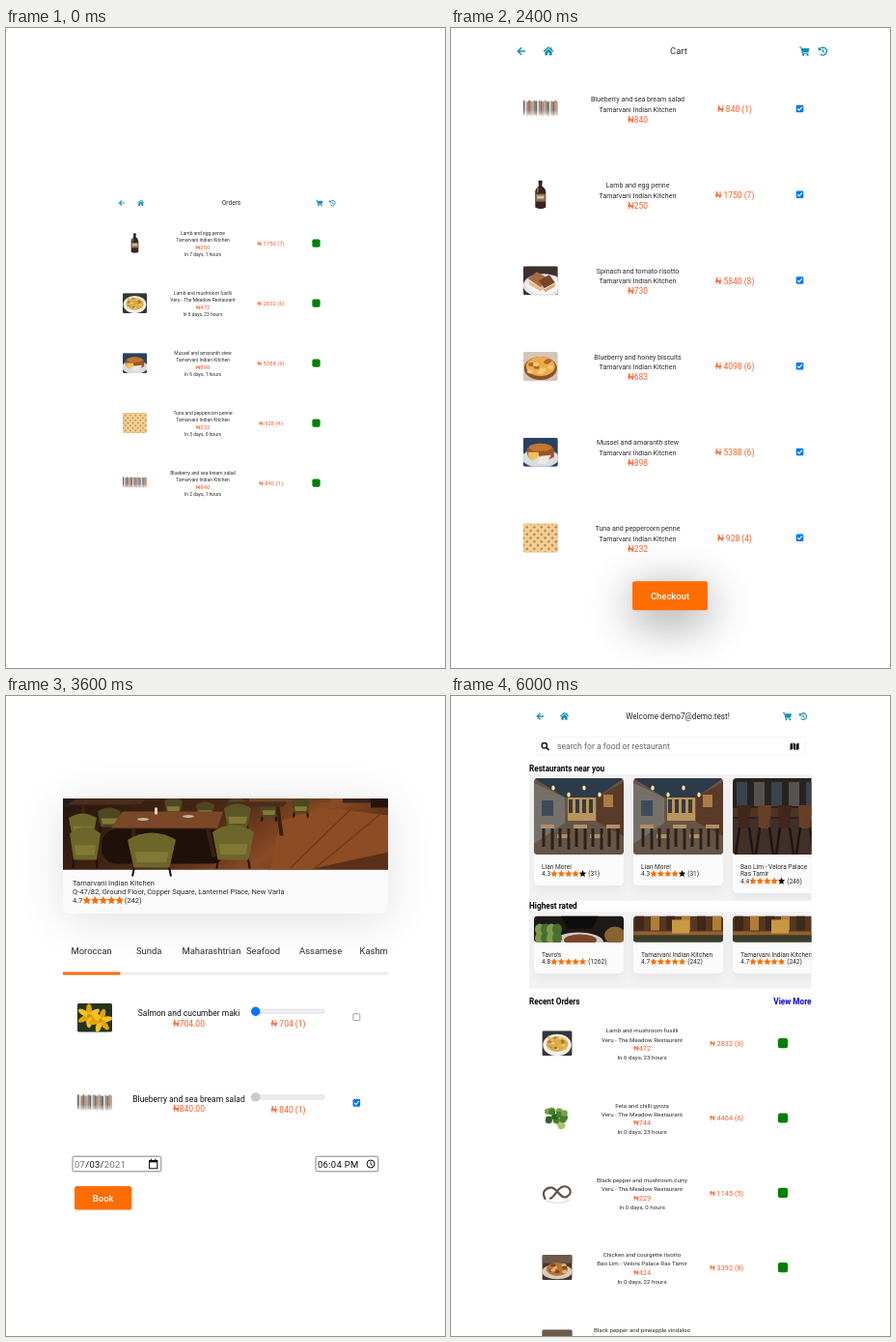
Write an HTML page that moves like this. It is 455x662 px and loops after 7.2 s.

```html
<!DOCTYPE html>
<html lang="en">
<head>
<meta charset="utf-8">
<title>Food ordering screens</title>
<style>
html, body { margin: 0; width: 100%; height: 100%; overflow: hidden; background: #fff; }
#stage { display: block; width: 455px; height: 662px; font-family: Roboto, sans-serif; }
.pay { font-family: "Open Sans", "Noto Sans", sans-serif; }
text { white-space: pre; }
</style>
</head>
<body>
<svg id="stage" viewBox="0 0 455 662"></svg>
<script>
const STEP = 1200;
const INK = '#2a2a2a', ORANGE = '#ff6d00', PRICE = '#ff5c26', TEAL = '#168db5', BLUE = '#0075ff';
const KITCHEN = 'Tamarvani Indian Kitchen';
const GARDEN = 'Veru - The Meadow Restaurant';
const PALACE = 'Bao Lim - Velora Palace Ras Tamir';

// Shape helpers; text is placed by the middle of its capitals.
const rect = (x, y, w, h, fill, r = 0, more = '') =>
  `<rect x="${x}" y="${y}" width="${w}" height="${h}" rx="${r}" fill="${fill}" ${more}/>`;
const oval = (x, y, rx, ry, fill) => `<ellipse cx="${x}" cy="${y}" rx="${rx}" ry="${ry}" fill="${fill}"/>`;
const fill = (d, color) => `<path d="${d}" fill="${color}"/>`;
const line = (d, color, w = 1) => `<path d="${d}" fill="none" stroke="${color}" stroke-width="${w}"/>`;
const text = (x, y, size, str, color = INK, anchor = 'start', more = '') =>
  `<text x="${x}" y="${y + size * .355}" font-size="${size}" fill="${color}" text-anchor="${anchor}" ${more}>${str}</text>`;
const mid = (x, y, size, str, color, more) => text(x, y, size, str, color, 'middle', more);
const at = (x, y, k, body) => `<g transform="translate(${x} ${y}) scale(${k})">${body}</g>`;
const range = (n, fn) => Array.from({ length: n }, (_, i) => fn(i)).join('');
let clips = 0;
const clip = (x, y, w, h, body, r = 0) => {
  const id = 'clip' + clips++;
  return `<clipPath id="${id}">${rect(x, y, w, h, '#000', r)}</clipPath><g clip-path="url(#${id})">${body}</g>`;
};
const BOLD = 'font-weight="700"', MEDIUM = 'font-weight="500"';

const defs = `<defs>
<filter id="wide" x="-150%" y="-300%" width="400%" height="700%"><feGaussianBlur stdDeviation="24"/></filter>
<filter id="near" x="-30%" y="-30%" width="160%" height="160%"><feGaussianBlur stdDeviation="6"/></filter>
<linearGradient id="fade" x2="0" y2="1"><stop stop-color="#fff" stop-opacity="0"/><stop offset="1" stop-color="#fff"/></linearGradient>
<linearGradient id="floor" x2="1" y2=".3"><stop stop-color="#24150d"/><stop offset=".5" stop-color="#4a2814"/><stop offset=".8" stop-color="#8a4b25"/><stop offset="1" stop-color="#5a3019"/></linearGradient>
<linearGradient id="wall" x2="1"><stop stop-color="#261b17"/><stop offset=".5" stop-color="#46301f"/><stop offset="1" stop-color="#2a1a12"/></linearGradient>
<linearGradient id="edge" x2="1"><stop stop-color="#fff"/><stop offset="1" stop-color="#f3f3f3"/></linearGradient>
</defs>`;

// Icons in a box of about ten units around the origin
const icons = {
  back: line('M4 0H-3.4M0-3.8L-3.7 0L0 3.8', TEAL, 1.5),
  home: line('M-5 .2L0-4L5 .2', TEAL, 1.2) +
    fill('M-3.6 .6L0-2.4L3.6 .6V4.3H.9V1.6H-.9V4.3H-3.6ZM2.3-4H3.6V-.8L2.3-2Z', TEAL),
  cart: line('M-5.2-4H-3.4L-2 2.2H4', TEAL, 1.1) + fill('M-3-3.1H5.2L4.2 1.2H-2.1Z', TEAL) +
    oval(-1.2, 3.8, 1.1, 1.1, TEAL) + oval(3.3, 3.8, 1.1, 1.1, TEAL),
  past: line('M-3.2-2.2A4 4 0 1 1-2.7 3M0-2.2V.4L1.8 1.6', TEAL, 1.2) + fill('M-4.8-4.4V-.7H-1Z', TEAL),
};
const star = (x, y, r, color) => fill('M' + Array.from({ length: 10 }, (_, i) => {
  const a = i * Math.PI / 5, q = i % 2 ? r * .48 : r;
  return `${(x + q * Math.sin(a)).toFixed(2)} ${(y - q * Math.cos(a)).toFixed(2)}`;
}).join('L') + 'Z', color);
const rating = (x, y, size, score, full, count, gap = 0) => {
  const pitch = size * 1.12, left = x + size * 1.4;
  return text(x, y, size, score) +
    range(5, i => star(left + pitch * (i + .5), y, pitch * .53, i < full ? ORANGE : '#111')) +
    text(left + pitch * 5 + size * .1 + gap, y, size, `(${count})`);
};
const tickBox = (x, y, on) => on
  ? rect(x - 3.8, y - 3.8, 7.6, 7.6, BLUE, 1.2) + line(`M${x - 2.2} ${y}l1.6 1.7l3-3.6`, '#fff', 1.1)
  : rect(x - 3.5, y - 3.5, 7, 7, '#fff', 1.1, 'stroke="#767676" stroke-width=".7"');

// Dishes, 36 by 30 around the origin
const BG = c => rect(-18, -15, 36, 30, c);
const PENS = ['#6b5d58', '#b9a48f', '#8a6650', '#e3d9cc', '#7b8f83', '#b8857b', '#8d90a6'];
const dishes = {
  pens: rect(-18, -8, 36, 14, '#cfc5bb') + range(20, i => rect(-18 + i * 1.8, -9 + i % 3 * .8, 1.6, 15, PENS[i * 3 % 7])) +
    rect(-18, 1, 36, 9, 'url(#fade)'),
  bottle: fill('M-2-14H1.6V-9Q6-6 5.5-2V13Q0 16-5.5 13V-2Q-6-6-2-9Z', '#37251f') + rect(-2.2, -15, 4, 3, '#222', 1) +
    rect(-5, -1, 10, 8, '#8f6d55') + rect(-3.5, 1, 7, 3, '#d9c2a4') + rect(-3.7, -8, 1.4, 6, '#94827a', .7),
  sandwich: BG('#3d302d') + oval(3, 5, 21, 12, '#e4e5ea') + oval(3, 5, 17, 9, '#f5f5f6') +
    fill('M-13-2L-4-9L9-2L0 7Z', '#a86b40') + fill('M-12 0L0 7L9 0V4L0 11L-12 4Z', '#e5bd8b') +
    fill('M-2 0L9-6L15 2L4 8Z', '#75472b') + fill('M-1 4L4 9L15 3V6L5 12Z', '#d5a575'),
  pie: BG('#d3c5b7') + oval(0, 2, 17, 12, '#90502b') + oval(0, 0, 15, 10, '#e9ad48') +
    range(9, i => oval(11 * Math.sin(i * 2.3), 6 * Math.cos(i * 2.9), 3, 2, i % 2 ? '#b66526' : '#f0cc75')),
  cake: BG('#284263') + oval(0, 6, 19, 10, '#d9dde1') + fill('M-14-4Q-1-14 14-4V5Q4 11-2 3L-9 8Q-15 5-14-4Z', '#9d5427') +
    fill('M-13 0L-2 0V5L-9 9Q-13 6-13 0Z', '#f0c05a') + oval(0, -5, 12, 4, '#c4752e') + fill('M0 4L11 3L6 12H-4Z', '#eee8df'),
  lattice: BG('#c08a4e') +
    range(9, i => line(`M${-44 + i * 7.5} 15l30-30M${-44 + i * 7.5}-15l30 30`, '#f0cf96', 3)),
  fusilli: BG('#343637') + oval(0, 2, 17, 13, '#f2efe9') + oval(0, 1, 13, 9, '#d9aa4c') +
    range(18, i => oval(10 * Math.sin(i * 2.4), 6.5 * Math.cos(i * 1.7), 2.3, 1.3, ['#f0d184', '#a87529', '#e5bb56'][i % 3])),
  broccoli: fill('M-5 0L2 13Q8 15 10 9L5-2Z', '#a8c66c') +
    range(13, i => oval(-1 + 10 * Math.sin(i * 2.4), -3 + 6 * Math.cos(i * 1.9), 4, 3.7, ['#487d2d', '#2f6422', '#75a44c'][i % 3])),
  loop: line('M-14 8Q-20-3-9-6C0-8 3 8 11 5C20 1 15-10 6-7C-1-4-3 6-9 7', '#62544d', 2.6) +
    line('M-14 9Q0 15 15 9', '#ddd', 1.3),
  risotto: BG('#4a3529') + rect(-18, -15, 36, 10, '#6d5a49') + oval(0, 5, 18, 9, '#d7cbbb') + oval(0, 2, 13, 8, '#b77432') +
    range(8, i => oval(9 * Math.sin(i * 2), 1 + 4 * Math.cos(i * 2.7), 3, 2, i % 2 ? '#e3b465' : '#804523')),
  lily: BG('#25331b') + range(2, j => at(-6 + j * 12, -2 + j * 5, 1, range(6, i =>
    `<ellipse cy="-6" rx="2.9" ry="6.5" fill="${i % 2 ? '#f4c21c' : '#e2a40d'}" transform="rotate(${i * 60 + j * 18})"/>`) + oval(0, 0, 2, 2, '#c98f14'))),
};
const dish = (x, y, k, name) => at(x, y, k, clip(-18, -15, 36, 30, dishes[name], 2));

// Large photographs
const chair = (x, y, w, h, c = '#6d662a') =>
  line(`M${x + w * .2} ${y + h * .6}L${x + w * .1} ${y + h * 1.25}M${x + w * .8} ${y + h * .6}L${x + w * .9} ${y + h * 1.25}`, '#1c0f08', 2) +
  fill(`M${x} ${y + h * .2}Q${x + w / 2} ${y - h * .2} ${x + w} ${y + h * .2}L${x + w * .87} ${y + h}H${x + w * .13}Z`, c) +
  fill(`M${x + w * .15} ${y + h * .55}H${x + w * .85}L${x + w * .8} ${y + h * .85}H${x + w * .2}Z`, '#827a34');
const table = (x, y, w, h, c = '#4a2d1d') =>
  line(`M${x + w * .2} ${y + h}V${y + h + 38}M${x + w * .86} ${y + h}L${x + w * .92} ${y + h + 30}`, '#3b2012', 4) +
  fill(`M${x + w * .1} ${y}H${x + w}L${x + w * .95} ${y + h}H${x}Z`, c);
const diningRoom = rect(0, 0, 337, 130, 'url(#wall)') + fill('M0 0H337V17L210 24L0 13Z', '#1d1512') +
  line('M80 0L195 22M160 0L210 20M240 0L225 20M337 3L245 21', '#5d452f', 1.5) +
  fill('M0 66L190 52L337 56V130H0Z', 'url(#floor)') +
  range(5, i => rect(48 + i * 17, 18 + i * 3, i % 2 ? 1 : 2, 28, i % 2 ? '#8f6238' : '#f3d7a2')) +
  rect(200, 25, 79, 34, '#7c5229') + range(3, i => rect(202, 27 + i * 7, 74, 1.5, '#e0b873')) +
  range(15, i => rect(203 + i * 5, 29 + i % 3 * 7, 2, 4, i % 2 ? '#e6d2a8' : '#38220f')) +
  rect(190, 45, 90, 3, '#d9b680') + rect(193, 48, 84, 12, '#6f4320') +
  rect(290, 15, 47, 46, '#38251a') + rect(319, 10, 18, 56, '#24160f') +
  fill('M225 80L270 66L337 74V112L255 130H215Z', '#8d4c24') + line('M236 128L300 66M262 128L330 72', '#70391a', 1.5) +
  range(5, i => chair(105 + i * 33, 56 + i % 2 * 4, 19, 16, '#4d4723')) +
  table(5, 57, 80, 6) + table(164, 60, 68, 5) +
  chair(6, 72, 29, 24) + chair(36, 66, 24, 20, '#4d4723') + chair(167, 62, 28, 24, '#5c5526') +
  rect(40, 88, 130, 36, '#1e110a', 16) +
  table(50, 70, 116, 17, '#7a4829') + rect(95, 66, 3, 7, '#ddd2b9') + oval(130, 75, 6, 1.5, '#c9b99e') + oval(83, 78, 6, 1.5, '#c9b99e') +
  chair(67, 92, 50, 36) + chair(155, 84, 43, 36) + chair(7, 86, 32, 34);
const cafe = rect(0, 0, 93, 79, '#6a5341') + fill('M0 0H93L65 20H32Z', '#2d3a48') +
  fill('M0 5L32 20V48L0 68Z', '#75716a') + fill('M93 4L65 20V45L93 60Z', '#5a3a28') + rect(35, 20, 29, 24, '#b8945f') +
  range(4, i => rect(36 + i * 7, 22, 4, 14, '#3c3a38') + oval(20 + i * 16, 10 + i % 2 * 7, 1.7, 2.5, '#ffe7ac')) +
  fill('M0 68L34 45H64L93 65V79H0Z', '#645545') +
  range(5, i => rect(7 + i * 17, 48 + i % 2 * 10, 14, 4, '#b08f68') + line(`M${10 + i * 17} 52v19M${19 + i * 17} 52v22`, '#2e2019', 3)) +
  rect(72, 17, 10, 13, '#a97c48') + rect(8, 23, 12, 16, '#3d4c5a');
const lounge = rect(0, 0, 93, 79, '#29231f') + range(5, i => rect(4 + i * 18, 4, 11, 25, i % 2 ? '#55524f' : '#38434c')) +
  rect(0, 31, 93, 9, '#4f3425') + fill('M0 42H93V79H0Z', '#403027') +
  range(4, i => fill(`M${5 + i * 21} 28h14l-2 24h-11Z`, i % 2 ? '#673f28' : '#3f271c') +
    line(`M${7 + i * 21} 51l-4 28M${17 + i * 21} 51l4 28`, '#1c1512', 2.5));
const plates = rect(0, 0, 93, 27, '#1d1917') + oval(46, 27, 26, 10, '#cfcac2') + oval(48, 25, 17, 6, '#7d4429') +
  range(8, i => oval(6 + i % 4 * 6, 14 + (i >> 2) * 9, 5, 6, i % 2 ? '#46702f' : '#7c9a4c')) + fill('M28 0H67L60 13H35Z', '#0c0c0c') + oval(84, 20, 11, 9, '#8a632f');
const counter = rect(0, 0, 93, 27, '#563721') + range(6, i => rect(2 + i * 16, 0, 9, 15, i % 2 ? '#b07d38' : '#3d2819')) +
  rect(0, 16, 93, 4, '#936030') + rect(0, 20, 93, 7, '#3a3d2c') + rect(40, 4, 18, 14, '#c99843');

// Shared screen parts
const header = (y, k, [a, b, c, d, e], title) =>
  at(a, y, k, icons.back) + at(b, y, k, icons.home) + mid(c, y, 9.45 * k, title) + at(d, y, k, icons.cart) + at(e, y, k, icons.past);
const order = (y, k, [photo, info, cost, mark], [art, name, place, price, qty, due]) => {
  const top = y + (due ? -15 : -10) * k;
  return dish(photo, y, k, art) + mid(info, top, 7.1 * k, name) + mid(info, top + 10.6 * k, 7.1 * k, place) +
    mid(info, top + 21 * k, 8.5 * k, '₦' + price, PRICE) + (due ? mid(info, top + 32 * k, 7.1 * k, `In ${due} hours`) : '') +
    mid(cost, y + .3, 8.5 * k, `₦ ${price * qty} (${qty})`, PRICE) +
    (due ? rect(mark - 5.9 * k, y - 5.9 * k, 11.8 * k, 11.8 * k, '#008000', 2.6 * k) : tickBox(mark, y - .3, true));
};
const button = (x, y, w, h, label) => rect(x, y, w, h, ORANGE, 2.5) + mid(x + w / 2, y + h / 2, 9.45, label, '#fff', MEDIUM);
const glow = (x, y, w, h, strength) => rect(x, y, w, h, '#000', 0, `opacity="${strength}" filter="url(#wide)"`);

const pens = ['pens', 'Blueberry and sea bream salad', KITCHEN, 840, 1];
const lamb = ['bottle', 'Lamb and egg penne', KITCHEN, 250, 7];
const mussel = ['cake', 'Mussel and amaranth stew', KITCHEN, 898, 6];
const tuna = ['lattice', 'Tuna and peppercorn penne', KITCHEN, 232, 4];
const fusilli = ['fusilli', 'Lamb and mushroom fusilli', GARDEN, 472, 6, '6 days, 23'];

const ordersScreen = () => header(181, .697, [120, 139.7, 233.5, 324.8, 338.2], 'Orders') +
  [[...lamb, '7 days, 1'], fusilli, [...mussel, '6 days, 1'], [...tuna, '3 days, 0'], [...pens, '2 days, 1']]
    .map((o, i) => order(222.6 + 62 * i, .697, [133.5, 204, 274.5, 321.5], o)).join('');

const cartScreen = () => header(24, 1, [73, 101, 236, 366.3, 385.5], 'Cart') +
  [pens, lamb, ['sandwich', 'Spinach and tomato risotto', KITCHEN, 730, 8],
    ['pie', 'Blueberry and honey biscuits', KITCHEN, 683, 6], mussel, tuna]
    .map((o, i) => order(83.8 + 88.75 * i, 1, [92.8, 193.5, 294, 361.5], o)).join('') +
  glow(188, 582, 78, 32, .45) + button(188, 572.3, 78, 30, 'Checkout');

const field = (y, h = 15.5) => rect(260.5, y + .6, 157.5, h, '#eee', 3) +
  rect(260.5, y, 157.5, h, '#fff', 3, 'stroke="#dedede" stroke-width=".7"');
function payScreen() {
  const gray = '#858585', dark = '#303030';
  const right = (y, size, str, c) => text(192, y, size, str, c, 'end');
  const items = [
    ['pens', 'Blueberry and sea bream salad @|' + KITCHEN + ' @Q-47/82,|Ground Floor, Copper Square, Lanternel|Place, New Varla', '840', 1],
    ['bottle', 'Lamb and egg penne @ Tamarvani|Indian Kitchen @Q-47/82, Ground|Floor, Copper Square, Lanternel Place,|New Varla', '1,750', 7, 250],
    ['sandwich', 'Spinach and tomato risotto @|' + KITCHEN + ' @Q-47/82,|Ground Floor, Copper Square,|Lanternel Place, New Varla', '5,840', 8, 730],
    ['pie', 'Blueberry and honey biscuits @|' + KITCHEN + ' @Q-47/82,|Ground Floor, Copper Square,', '4,098', 6],
  ];
  const list = items.map(([art, lines, sum, qty, each], i) => {
    const y = 258 + i * 48;
    return dish(46.5, y + 3, .48, art) + lines.split('|').map((s, j) => text(62, y + j * 8.25, 5.55, s, dark)).join('') +
      right(y, 5.55, `$${sum}.00`, dark) + text(62, y + 33, 4.8, 'Qty ' + qty, gray) +
      (each ? right(y + 33, 4.8, `$${each}.00 each`, gray) : '');
  }).join('');
  const label = (y, s) => text(260.5, y, 5.2, s, '#555');
  const hint = (x, y, s) => text(x, y, 5.5, s, '#777');
  return '<g class="pay">' + rect(223, 165, 4.5, 333, 'url(#edge)') + line('M228 498.5H455', '#f4f4f4') +
    line('M34.5 191.5H29.5M31.5 189.5L29.5 191.5L31.5 193.5', '#999', .7) +
    line('M41.3 189.5H45.8V194H41.3ZM40.8 190.8H46.3', '#444', .8) +
    text(52.5, 191.5, 5.6, "Tolmo's apps", dark) + rect(87.3, 188, 29, 7.3, '#ffcf70', 1.3) +
    mid(101.8, 191.7, 4.1, 'TEST MODE', '#a04b00', BOLD) +
    text(37.5, 215, 6.35, "Pay Tolmo's apps", gray) + text(37.5, 230.7, 13.8, '$18,844.00', '#222', 'start', 'font-weight="600"') +
    clip(30, 250, 170, 170.2, list) + line('M37 420.3H192', '#e6e6e6', .7) +
    text(37.5, 442.3, 4.7, 'Powered by', gray) + text(64, 442.2, 5.1, 'quorva', '#666', 'start', BOLD) +
    line('M84.8 439V446', '#e4e4e4', .7) + text(92, 442.3, 4.7, 'Terms', gray) + text(109.5, 442.3, 4.7, 'Privacy', gray) +
    text(260.5, 192, 7.9, 'Pay with card', dark, 'start', MEDIUM) +
    label(209.3, 'Email') + field(214) + label(240.5, 'Card information') + field(245.5, 30) +
    line('M260.5 260.5H418M338.5 260.5V275.5', '#dedede', .7) + hint(265.5, 253.3, '1234 1234 1234 1234') +
    ['#18337f', '#d71920', '#0878d1', '#e58024'].map((c, i) => rect(368 + i * 11.6, 250, 10, 6.5, c, .7)).join('') +
    hint(265.5, 268.2, 'MM / YY') + hint(343.5, 268.2, 'CVC') +
    rect(402, 265, 10, 6, '#aaa', .7) + rect(402, 266.3, 10, 1.2, '#666') + oval(410.5, 266.8, 2.6, 2.6, '#666') +
    label(287, 'Name on card') + field(291.5) + label(318.3, 'Country or region') + field(323) +
    text(265.5, 331, 5.6, 'Nigeria', dark) + line('M408.3 329.8L410.5 332L412.7 329.8', '#333', .9) +
    rect(260.5, 349.5, 157.5, 18, '#0074d4', 3) + mid(339.3, 358.6, 6, 'Pay $18,844.00', '#c8e0f6', 'font-weight="600"') + '</g>';
}

const menuRow = (y, art, name, price, on, locked) => dish(92, y + .5, 1, art) + mid(189.5, y - 4.2, 8.5, name, '#111') +
  mid(189.5, y + 6.3, 8.5, `₦${price}.00`, PRICE) +
  rect(254, y - 8, 76, 4, '#efefef', 2, 'stroke="#c4c4c4" stroke-width=".5"') + oval(258.7, y - 6, 4.7, 4.7, locked ? '#cbcbcb' : BLUE) +
  mid(292.5, y + 7, 8.5, `₦ ${price} (1)`, PRICE) + tickBox(363.3, y, on);

// The restaurant page; `scroll` moves it up, `booking` adds the date and time row.
function menuScreen(top, bottom, scroll, booking) {
  const tabs = [['Moroccan', 67.5], ['Sunda', 135], ['Maharashtrian', 182.5], ['Seafood', 249], ['Assamese', 304], ['Kashmiri', 366.5]];
  const photo = clip(59, 123, 337, 140, at(59, 123, 1, diningRoom), 6);
  const page = rect(59, 123, 337, 175.5, '#fafafa', 6) + photo +
    text(69, 267, 7.56, KITCHEN) + text(69, 276.3, 7.56, 'Q-47/82, Ground Floor, Copper Square, Lanternel Place, New Varla') +
    rating(69, 285, 7.56, '4.7', 5, 242) +
    tabs.map(([s, x]) => text(x, 337.5, 9.45, s)).join('') + rect(59, 359, 337, 3, '#ececec') + rect(59, 359, 59.5, 3, ORANGE) +
    menuRow(405.7, 'lily', 'Salmon and cucumber maki', 704, false) +
    menuRow(494.4, 'pens', 'Blueberry and sea bream salad', 840, booking, booking) +
    (booking ? '' : menuRow(583.2, 'bottle', 'Lamb and egg penne', 250, false));
  const box = (x, w) => rect(x, 476.2, w, 15.6, '#fff', 1.5, 'stroke="#767676" stroke-width=".9"');
  return glow(59, 185 - scroll, 337, 120, .12) +
    clip(59, top, 337, bottom - top, `<g transform="translate(0 ${-scroll})">${page}</g>`) +
    (booking ? box(69, 91.8) + text(71, 484.3, 9.45, '07<tspan fill="#111">/03/</tspan>2021', '#777', 'start', 'letter-spacing=".3"') +
      line('M148.6 480.6H156.8V488.8H148.6ZM150.5 478.8V481M154.9 478.8V481', '#111', 1.1) + rect(148.6, 480.2, 8.2, 2.2, '#111') +
      box(321, 64.8) + text(323, 484.3, 9.45, '06:04 PM', '#111', 'start', 'letter-spacing=".3"') +
      '<circle cx="378" cy="484" r="4" fill="none" stroke="#111"/>' + line('M378 481.5V484.4L380 485.5', '#111', .9) +
      button(71, 507, 59.3, 24.5, 'Book')
      : header(107, 1, [73, 101, 236.5, 367, 386.5], KITCHEN));
}

function homeScreen() {
  const card = (x, y, photoH, h, photo, names, ...stars) =>
    rect(x, y + 6, 93, h, '#000', 5, 'opacity=".05" filter="url(#near)"') + rect(x, y, 93, h, '#fbfbfb', 5) +
    clip(x, y, 93, photoH, at(x, y, 1, photo), 4) +
    names.map((s, i) => text(x + 8, y + photoH + 12.3 + i * 7.7, 6.6, s)).join('') +
    rating(x + 8, y + photoH + 12.3 + names.length * 7.6, 6.6, ...stars, 1.3);
  const heading = (y, s) => text(81, y, 8.2, s, '#000', 'start', BOLD);
  const xs = [86, 189, 292];
  const near = rect(81, 81, 293, 131, '#f3f3f4') + xs.map((x, i) => i < 2
    ? card(x, 85, 79, 111, cafe, ['Lian Morei'], '4.3', 4, 31)
    : card(x, 85, 79, 119, lounge, ['Bao Lim - Velora Palace', 'Ras Tamir'], '4.4', 4, 246)).join('');
  const best = rect(81, 223, 293, 80, '#f3f3f4') + xs.map((x, i) => i
    ? card(x, 227.5, 27.5, 59.5, counter, [KITCHEN], '4.7', 5, 242)
    : card(x, 227.5, 27.5, 59.5, plates, ["Tavro's"], '4.8', 5, 1262)).join('');
  const recent = [fusilli, ['broccoli', 'Feta and chilli gyoza', GARDEN, 744, 6, '0 days, 23'],
    ['loop', 'Black pepper and mushroom curry', GARDEN, 229, 5, '0 days, 0'],
    ['risotto', 'Chicken and courgette risotto', PALACE, 424, 8, '0 days, 22'],
    ['risotto', 'Black pepper and pineapple vindaloo', KITCHEN, 520, 2, '0 days, 2']];
  return header(21, .868, [92.5, 117.5, 235, 348.5, 365], 'Welcome demo7@demo.test!') +
    rect(88.5, 42.5, 279, 19, '#fff', 2, 'stroke="#f1f1f1" stroke-width=".8"') +
    '<circle cx="96.8" cy="51.2" r="2.7" fill="none" stroke="#111" stroke-width="1.3"/>' + line('M98.8 53.2L101.5 56', '#111', 1.6) +
    text(110, 52.2, 8.65, 'search for a food or restaurant', '#666') +
    fill('M351.5 49.5L354 48.4V55L351.5 56ZM354.7 48.4L357.3 49.5V56L354.7 55ZM358 49.5L360.6 48.4V55L358 56Z', '#111') +
    heading(75, 'Restaurants near you') + clip(81, 81, 292.5, 131, near) +
    heading(217.2, 'Highest rated') + clip(81, 223, 292.5, 80, best) +
    heading(316, 'Recent Orders') + text(373.5, 316, 8.2, 'View More', '#0000ee', 'end', BOLD) +
    recent.map((o, i) => order(359.2 + 77.3 * i, .868, [110, 198, 285.5, 344], o)).join('');
}

const screens = [ordersScreen(), payScreen(), cartScreen(),
  menuScreen(106, 450, 73.5, true), menuScreen(102, 579, 0, false), homeScreen()];
const stage = document.getElementById('stage');
stage.innerHTML = defs + screens.map(s => `<g class="screen" opacity="0">${s}</g>`).join('');

// Each screen is shown for one step of the loop, with hard cuts.
const count = screens.length;
stage.querySelectorAll('.screen').forEach((screen, i) => screen.animate(
  Array.from({ length: count + 1 }, (_, j) => ({ opacity: +(j % count === i), offset: j / count, easing: 'steps(1, end)' })),
  { duration: STEP * count, iterations: Infinity }));
</script>
</body>
</html>
```
